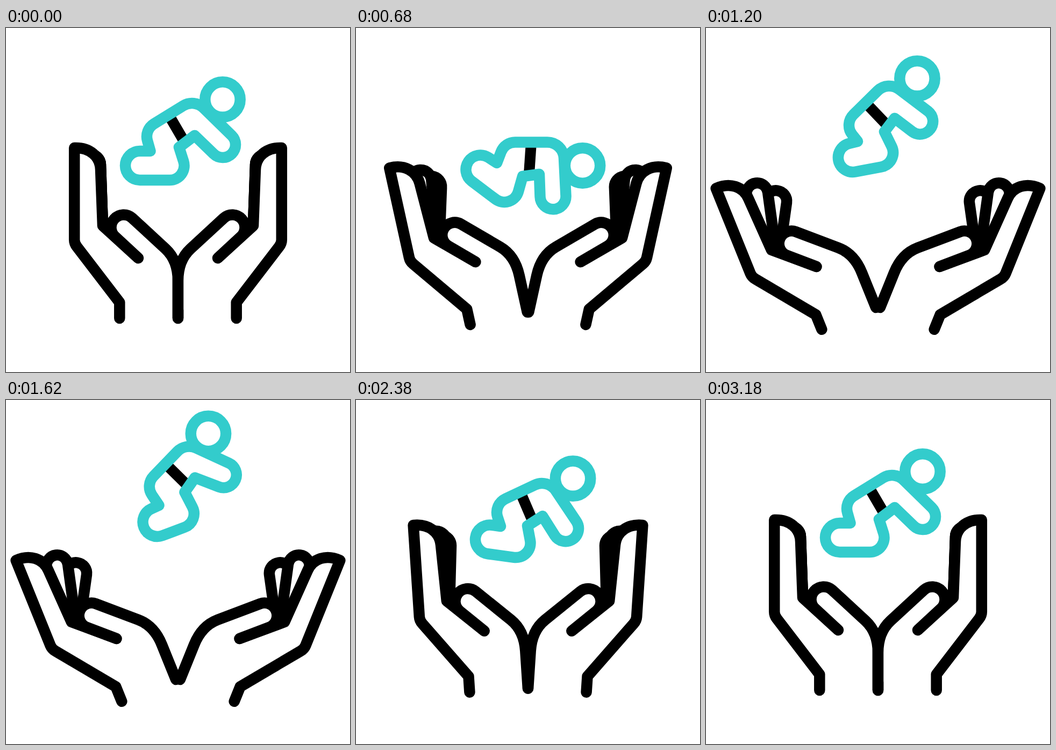
Recreate the animation shown at these times as an HTML page. Size 640 by 640 pixels, loop 3.6 s.

```html
<!DOCTYPE html>
<html lang="en">
<head>
<meta charset="utf-8">
<title>Caring hands</title>
<style>
  html, body { margin: 0; width: 100%; height: 100%; overflow: hidden; background: #fff; }
  svg { display: block; width: 100vw; height: 100vh; }
  path, circle { stroke-width: 20.5; stroke-linecap: round; stroke-linejoin: round; }
  .hand path { fill: #fff; stroke: #000; }
  .baby * { fill: none; stroke: #33cccc; }
  .baby #belt { stroke: #000; stroke-width: 20; stroke-linecap: butt; }
</style>
</head>
<body>
<svg viewBox="0 0 640 640">
  <g id="left" class="hand">
    <g id="turn">
      <path id="finger2"/>
      <path id="finger1"/>
      <path d="M211.3 540V510.5L132 407Q127.2 401 127.2 394V223C156 222 175 239 176 263L180 368L246 428"/>
      <path d="M320 540V470C320 445 312 425 297 411L234.8 353.6A23.5 23.5 0 0 0 203.2 388.4L246 428"/>
    </g>
  </g>
  <use href="#left" transform="matrix(-1 0 0 1 640 0)"/>
  <g class="baby">
    <path id="belt"/>
    <path id="body"/>
    <circle id="head" r="32.7"/>
  </g>
</svg>
<script>
const LOOP = 3600;
const el = id => document.getElementById(id);
const mix = (a, b, k) => a + (b - a) * k;
const mixAll = (p, q, k) => p.map((v, i) => mix(v, q[i], k));

// Each pose: head, shoulder, hip, heel, foot, knee, belly, armpit, hand (x, y).
const rest  = [403,133, 346,171, 290,202, 268.5,229, 249,256, 304.5,256, 322,222, 351,200, 403,217];
const sink  = [411,179, 347,209, 290,228, 264,256, 241.5,280.5, 296,287, 319,257, 351,238, 399,262];
const low   = [421.5,256, 356,243.5, 296,240.5, 262,251, 231.5,263.5, 276,297, 310,276, 341,272, 366.5,313];
const rise  = [393,94, 341,139, 294,181, 282,211, 273,241, 321,232, 332,193, 351,168, 398.5,174];
const fall  = [360,85, 341,150, 295.5,195, 287,235, 290,267, 324.5,245, 333,204, 352,175, 411,158.5];
const land  = [403.5,146, 346,186, 290,209, 269,235, 249,259.5, 297.5,266, 319,234, 347,216, 390,239];
const peak  = mixAll(rise, fall, .5).map((v, i) => i % 2 ? v - 27 : v);
const dip   = mixAll(land, sink, .3);
const settle = rest.slice();
settle[0] += 7; settle[1] += 5; settle[8] -= 4; settle[9] -= 2;

const poses = [[0, rest], [320, sink], [680, low], [1200, rise], [1620, peak],
  [2000, fall], [2380, land], [2500, dip], [2720, settle], [3180, rest], [LOOP, rest]];
const handTurn = [[0, 0], [330, 0], [540, 6], [680, 12.4], [1080, 21.5], [1200, 22],
  [1660, 22], [2000, 18.2], [2180, 11.9], [2380, 3.8], [2620, 0], [LOOP, 0]];
const fingerSpread = [[0, 0], [330, 0], [680, .6], [1200, 1], [1700, 1],
  [2000, .94], [2380, .3], [2640, 0], [LOOP, 0]];

// Smooth monotone interpolation through [time, value] keys.
function at(keys, t, pick = v => v) {
  const last = keys.length - 1;
  let i = 0;
  while (i < last - 1 && t >= keys[i + 1][0]) i++;
  const val = j => pick(keys[j][1]);
  const secant = j => (val(j + 1) - val(j)) / (keys[j + 1][0] - keys[j][0]);
  const slope = j => {
    if (j <= 0 || j >= last) return 0;
    const a = secant(j - 1), b = secant(j);
    return a * b <= 0 ? 0 : 2 * a * b / (a + b);
  };
  const span = keys[i + 1][0] - keys[i][0];
  const u = (t - keys[i][0]) / span, w = 1 - u;
  return val(i) * (1 + 2 * u) * w * w + val(i + 1) * (3 - 2 * u) * u * u
    + span * u * w * (slope(i) * w - slope(i + 1) * u);
}

const RADII = [31, 28, 0, 27, 27, 0, 0, 24];
const pt = p => p[0].toFixed(2) + ' ' + p[1].toFixed(2);

// Outer tangent between two discs, going counterclockwise around the body.
function tangent(a, b, ra, rb) {
  const dx = b[0] - a[0], dy = b[1] - a[1], len = Math.hypot(dx, dy);
  const s = Math.max(-1, Math.min(1, (ra - rb) / len)), c = Math.sqrt(1 - s * s);
  const n = [(dx * s - dy * c) / len, (dy * s + dx * c) / len];
  const touch = (p, r) => [p[0] + n[0] * r, p[1] + n[1] * r];
  return { from: touch(a, ra), to: touch(b, rb), angle: Math.atan2(n[1], n[0]) };
}

function drawBaby(t) {
  const pose = rest.map((_, i) => at(poses, t, p => p[i]));
  const joints = RADII.map((_, i) => [pose[2 * i + 2], pose[2 * i + 3]]);
  const sides = joints.map((p, i) => {
    const j = (i + 1) % joints.length;
    return tangent(p, joints[j], RADII[i], RADII[j]);
  });
  let d = 'M' + pt(sides[0].from);
  sides.forEach((side, i) => {
    const j = (i + 1) % sides.length, next = sides[j], r = RADII[j];
    d += 'L' + pt(side.to);
    if (r) {
      const sweep = (side.angle - next.angle + 4 * Math.PI) % (2 * Math.PI);
      d += `A${r} ${r} 0 ${sweep > Math.PI ? 1 : 0} 0 ${pt(next.from)}`;
    }
  });
  el('body').setAttribute('d', d + 'Z');
  const back = mixAll(sides[0].from, sides[0].to, .5);
  const front = mixAll(joints[5], joints[6], .38);
  el('belt').setAttribute('d', `M${pt(back)}L${pt(front)}`);
  el('head').setAttribute('cx', pose[0]);
  el('head').setAttribute('cy', pose[1]);
}

// A rounded finger leaning out from behind the front one.
function drawFinger(id, k, tip, baseX, lean) {
  const p = mixAll([176, 254], tip, k);
  const a = mix(-2, lean, k) * Math.PI / 180;
  const q = [p[0] - 40 * Math.cos(a), p[1] - 40 * Math.sin(a)];
  el(id).setAttribute('d',
    `M180 368L${pt(q)}A20 20 0 0 1 ${pt(p)}L${pt([mix(180, baseX, k), 368])}`);
}

function frame(now) {
  const t = now % LOOP;
  const k = at(fingerSpread, t);
  el('turn').setAttribute('transform', `rotate(${-at(handTurn, t)} 266.6 540)`);
  drawFinger('finger1', k, [213.8, 266], 188, 14.5);
  drawFinger('finger2', k, [239, 297], 198, 30);
  drawBaby(t);
}

const start = performance.now();
function tick() {
  frame(performance.now() - start);
  requestAnimationFrame(tick);
}
tick();
</script>
</body>
</html>
```
